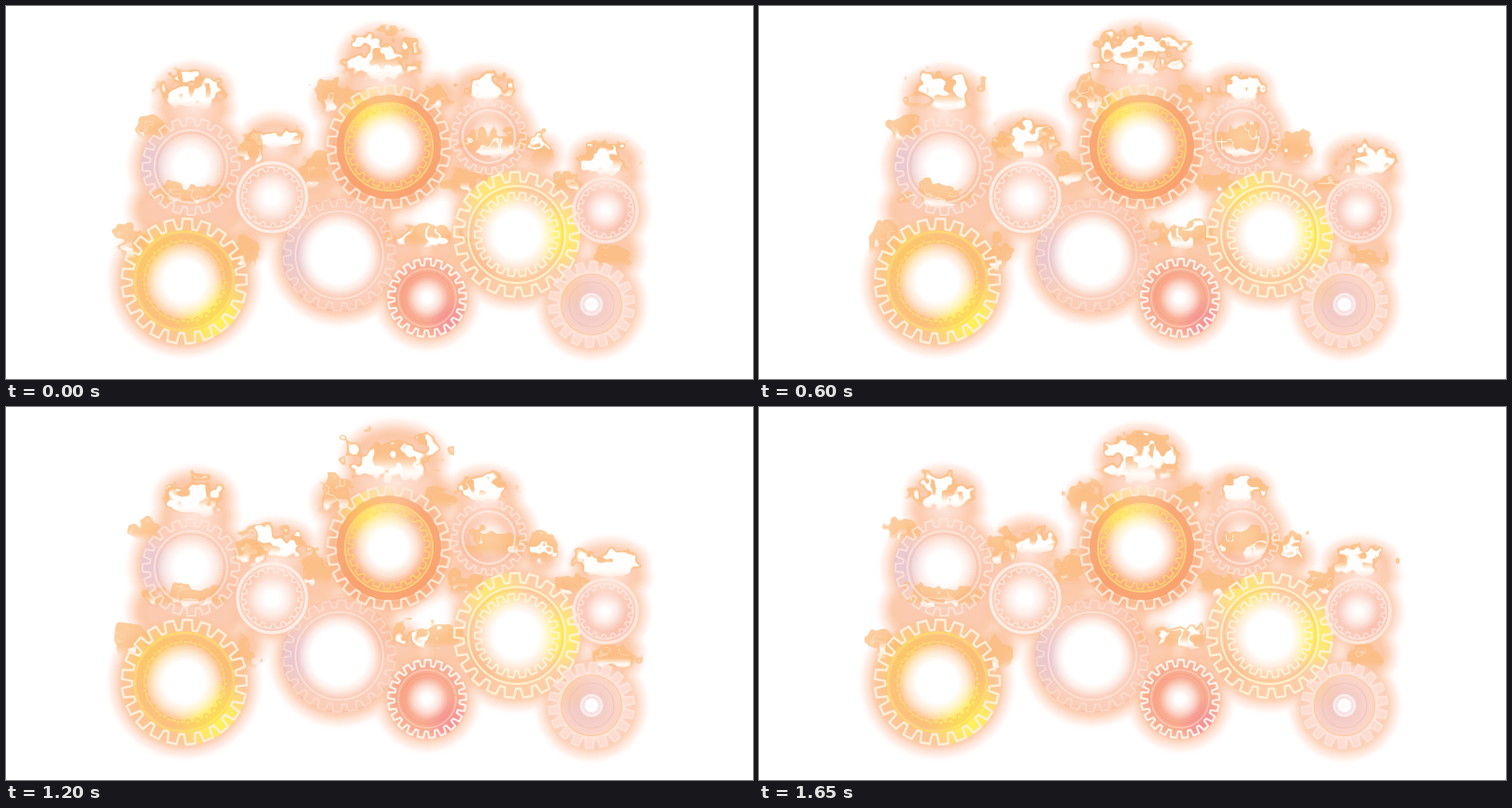
These frames come from a looping animation (800 by 400 pixels, 1.8 s). An HTML page with a canvas:

```html
<!DOCTYPE html>
<html lang="en">
<head>
<meta charset="utf-8">
<title>Burning gears</title>
<style>
html, body { margin: 0; width: 100%; height: 100%; overflow: hidden; background: #fff; }
canvas { display: block; width: 800px; height: 400px; }
</style>
</head>
<body>
<canvas id="stage" width="800" height="400"></canvas>
<script>
const W = 800, H = 400, LOOP = 1800, STEPS = 12, TAU = Math.PI * 2;
const stage = document.getElementById('stage').getContext('2d');

function layer(w = W, h = H) {
  const c = document.createElement('canvas');
  c.width = w;
  c.height = h;
  return c.getContext('2d');
}

// tints: [dx, dy, radius, rgb, alpha]; teeth: [inner, outer, count, colour, width, phase]; rings: [radius, colour, width]
const gears = [
  { x: 357, y: 267, r: 62, fill: '250,207,189', hole: [30, 45],
    tints: [[-50, 0, 42, '225,196,216', .7], [42, -25, 35, '251,178,142', .45]],
    teeth: [[52, 60, 22, 'rgba(255,228,217,.6)', 1.8, 0]],
    rings: [[47, 'rgba(255,232,222,.65)', 2], [60, 'rgba(247,176,150,.35)', 1.5]] },
  { x: 198, y: 172, r: 54, fill: '250,207,188', hole: [17, 38],
    tints: [[-46, -4, 38, '226,198,220', .75], [35, 20, 32, '251,184,145', .5]],
    teeth: [[44, 52, 20, 'rgba(255,230,218,.8)', 2, .1]],
    rings: [[39, 'rgba(255,234,224,.7)', 2], [36, 'rgba(244,172,140,.4)', 1]] },
  { x: 285, y: 205, r: 39, fill: '251,205,187', hole: [7, 29],
    tints: [[-20, -25, 22, '251,190,155', .4]],
    teeth: [[28, 32, 17, 'rgba(255,238,229,.75)', 1.6, 0]],
    rings: [[37, 'rgba(255,239,231,.95)', 3.5], [33, 'rgba(255,236,226,.6)', 1.5]] },
  { x: 517, y: 140, r: 41, fill: '251,205,183', hole: [0, 22],
    tints: [[-12, 8, 24, '248,170,136', .5], [28, 12, 24, '251,180,140', .4]],
    teeth: [[34, 40, 20, 'rgba(255,230,218,.8)', 1.8, .1]],
    rings: [[28, 'rgba(255,234,224,.75)', 2], [31, 'rgba(244,170,138,.35)', 1]] },
  { x: 410, y: 151, r: 66, fill: '250,178,132', hole: [20, 41],
    tints: [[-16, -40, 44, '255,240,92', .95], [30, 30, 44, '249,158,108', .5], [-36, 40, 34, '249,158,110', .5]],
    teeth: [[57, 66, 21, 'rgba(255,232,213,.95)', 2.4, .05], [39, 44, 22, 'rgba(254,221,112,.8)', 1.5, 0]],
    rings: [[52, 'rgba(249,154,98,.48)', 8], [47, 'rgba(255,216,122,.85)', 1.8], [57, 'rgba(255,215,180,.5)', 1.2]] },
  { x: 547, y: 245, r: 68, fill: '253,207,168', hole: [24, 44],
    tints: [[46, 0, 40, '255,243,92', .95], [-28, -46, 40, '255,238,105', .8], [-44, 34, 34, '250,180,140', .6]],
    teeth: [[57, 67, 21, 'rgba(255,243,215,.96)', 2.4, 0], [38, 45, 22, 'rgba(255,246,218,.9)', 2, .1]],
    rings: [[52, 'rgba(255,244,206,.9)', 2], [49, 'rgba(251,190,118,.5)', 1.2]] },
  { x: 642, y: 219, r: 35, fill: '250,203,188', hole: [3, 22],
    tints: [[14, 14, 22, '247,178,156', .4]],
    teeth: [[25, 29, 17, 'rgba(255,236,228,.7)', 1.5, .1]],
    rings: [[34, 'rgba(255,233,223,.9)', 3.5], [30, 'rgba(255,238,230,.6)', 1.3]] },
  { x: 191, y: 295, r: 68, fill: '252,196,140', hole: [22, 42],
    tints: [[34, 40, 46, '255,245,84', .98], [-32, -28, 40, '253,212,94', .6], [44, -26, 30, '251,184,124', .5]],
    teeth: [[56, 67, 21, 'rgba(255,240,220,.97)', 2.4, .08], [41, 45, 26, 'rgba(250,188,92,.6)', 1.3, 0]],
    rings: [[53, 'rgba(255,219,108,.85)', 2.4], [48, 'rgba(251,190,95,.45)', 5], [43, 'rgba(255,225,120,.7)', 1.5]] },
  { x: 451, y: 313, r: 43, fill: '248,170,144', hole: [5, 23],
    tints: [[28, 28, 30, '243,136,152', .8], [-16, -6, 28, '249,155,122', .5]],
    teeth: [[35, 42, 21, 'rgba(255,243,235,.97)', 2.2, .05]],
    rings: [[31, 'rgba(255,205,178,.75)', 1.8], [27, 'rgba(245,150,125,.4)', 1.4]] },
  { x: 627, y: 320, r: 46, fill: '251,214,202', hole: [0, 14],
    tints: [[-4, 0, 31, '231,190,198', .65], [-26, -18, 26, '251,199,145', .5]],
    teeth: [[36, 46, 18, 'rgba(255,231,222,.85)', 1.8, 0, 'rgba(253,226,216,.65)']],
    rings: [[33, 'rgba(250,202,146,.8)', 2], [24, 'rgba(236,190,190,.5)', 1.2], [11, 'rgba(255,245,241,.8)', 2], [5, '#fff', 4]] }
];

// links filling the body between gears: x, y, radius
const links = [
  [355, 102, 17], [463, 97, 15], [572, 160, 13], [597, 200, 12], [652, 265, 20],
  [165, 218, 24], [225, 218, 26], [334, 183, 20], [255, 255, 14], [395, 215, 20],
  [318, 227, 20], [488, 287, 14], [597, 288, 12], [492, 185, 18], [250, 172, 20],
  [426, 258, 18], [470, 258, 15]
];

// tall flames: [cx, cy, rx, ry] at every second step
const tall = [
  [[403, 58, 37, 28], [412, 58, 38, 29], [408, 54, 44, 28], [406, 54, 44, 27], [416, 56, 46, 30], [416, 57, 44, 29]],
  [[201, 92, 32, 20], [197, 95, 32, 22], [198, 96, 35, 22], [203, 97, 35, 25], [203, 98, 33, 22], [197, 95, 30, 19]],
  [[288, 140, 25, 14], [285, 142, 31, 21], [287, 145, 32, 21], [285, 147, 33, 20], [290, 149, 32, 18], [290, 146, 28, 18]],
  [[642, 166, 30, 18], [646, 166, 32, 19], [646, 167, 32, 18], [650, 169, 29, 16], [646, 168, 32, 16], [646, 168, 30, 14]],
  [[513, 89, 28, 15]]
];

// small patches: cx, cy, rx, ry, whiteness
const patches = [
  [193, 204, 34, 14, .25], [352, 98, 20, 20, .3], [524, 148, 30, 17, .45], [573, 153, 14, 18, .7],
  [491, 190, 18, 14, .1], [452, 247, 34, 15, .75], [651, 270, 22, 13, .25], [133, 252, 16, 20, .2],
  [257, 268, 13, 18, .15], [330, 178, 16, 18, .2], [153, 132, 16, 14, .2], [262, 155, 15, 18, .2],
  [462, 98, 16, 13, .1], [605, 190, 14, 14, .3]
];

const smooth = (a, b, v) => {
  const t = Math.min(1, Math.max(0, (v - a) / (b - a)));
  return t * t * (3 - 2 * t);
};

function hash(i, j, seed) {
  let h = Math.imul(i + 101, 374761393) ^ Math.imul(j + 57, 668265263) ^ Math.imul(seed + 7, 1274126177);
  h = Math.imul(h ^ (h >>> 13), 1274126177);
  return ((h ^ (h >>> 16)) >>> 0) / 4294967296;
}

// value noise, periodic in y so the flames loop
function noise(x, y, seed, period) {
  const i = Math.floor(x), j = Math.floor(y);
  const u = smooth(0, 1, x - i), v = smooth(0, 1, y - j);
  const a = ((j % period) + period) % period, b = (a + 1) % period;
  const top = hash(i, a, seed) * (1 - u) + hash(i + 1, a, seed) * u;
  const low = hash(i, b, seed) * (1 - u) + hash(i + 1, b, seed) * u;
  return top * (1 - v) + low * v;
}

const CELLS = 8;
function turbulence(x, y, seed, phase) {
  const a = x / 12, b = y / 12 + phase * CELLS;
  return noise(a, b, seed, CELLS) * .6 + noise(a * 2, b * 2, seed + 1, CELLS * 2) * .4;
}

function pose(keys, step) {
  const n = keys.length, at = step / STEPS * n, i = Math.floor(at) % n, f = at % 1;
  return keys[i].map((v, k) => v + (keys[(i + 1) % n][k] - v) * f);
}

function flame(g, [cx, cy, rx, ry, white = 1], phase, seed) {
  const x0 = Math.floor(cx - rx * 1.4), y0 = Math.floor(cy - ry * 1.4);
  const w = Math.ceil(rx * 2.8), h = Math.ceil(ry * 2.8);
  const tile = layer(w, h), img = tile.createImageData(w, h);
  for (let y = 0; y < h; y++) for (let x = 0; x < w; x++) {
    const u = (x0 + x - cx) / rx, v = (y0 + y - cy) / ry;
    const rough = 1.7 * (1 - .6 * smooth(0, .8, v));
    const n = turbulence(x0 + x, y0 + y, seed, phase) - .5;
    const m = turbulence(x0 + x + 300, y0 + y, seed + 5, phase);
    const body = 1.05 - Math.hypot(u, v) + n * rough;
    const low = smooth(.35, 1.15, v);
    const core = smooth(.2, .34, body) * (1 - low);
    const flake = smooth(.57, .64, m) * (1 - smooth(-.2, .55, v));
    const rim = smooth(-.02, .14, body) * .72 * (1 - smooth(.1, .85, v));
    const light = core * (1 - flake) * (white < 1 ? smooth(.62 - white * .25, .7 - white * .25, m) : 1);
    const alpha = light + (1 - light) * rim;
    const mix = alpha ? light / alpha : 0, k = (y * w + x) * 4;
    img.data[k] = 251 + 4 * mix;
    img.data[k + 1] = 187 + 67 * mix;
    img.data[k + 2] = 122 + 130 * mix;
    img.data[k + 3] = alpha * 255;
  }
  tile.putImageData(img, 0, 0);
  g.drawImage(tile.canvas, x0, y0);
}

function disc(g, x, y, r, stops) {
  const grad = g.createRadialGradient(x, y, 0, x, y, r);
  for (const [at, colour] of stops) grad.addColorStop(at, colour);
  g.fillStyle = grad;
  g.beginPath();
  g.arc(x, y, r, 0, TAU);
  g.fill();
}

function drawDisc(g, { x, y, r, fill, hole, tints }) {
  disc(g, x, y, r * 1.06, [[0, `rgba(${fill},.9)`], [.8, `rgba(${fill},.9)`], [1, `rgba(${fill},0)`]]);
  g.save();
  g.beginPath();
  g.arc(x, y, r, 0, TAU);
  g.clip();
  for (const [dx, dy, size, rgb, a] of tints)
    disc(g, x + dx, y + dy, size, [[0, `rgba(${rgb},${a})`], [.4, `rgba(${rgb},${a * .75})`], [1, `rgba(${rgb},0)`]]);
  g.restore();
  const [r0, r1] = hole;
  disc(g, x, y, r1, [[0, '#fff'], [r0 / r1, '#fff'], [(r0 + r1) / 2 / r1, 'rgba(255,255,255,.62)'], [1, 'rgba(255,255,255,0)']]);
}

function drawTeeth(g, x, y, [inner, outer, count, colour, width, phase, fill]) {
  g.beginPath();
  for (let i = 0; i < count; i++)
    for (const [part, r] of [[0, inner], [.3, inner], [.4, outer], [.9, outer]]) {
      const a = (i + part) / count * TAU + phase;
      g.lineTo(x + Math.cos(a) * r, y + Math.sin(a) * r);
    }
  g.closePath();
  if (fill) {
    g.fillStyle = fill;
    g.moveTo(x + inner - 2, y);
    g.arc(x, y, inner - 2, 0, TAU);
    g.fill('evenodd');
  }
  g.strokeStyle = colour;
  g.lineWidth = width;
  g.lineJoin = 'round';
  g.stroke();
}

function drawLines(g, { x, y, teeth, rings }) {
  for (const [r, colour, width] of rings) {
    g.strokeStyle = colour;
    g.lineWidth = width;
    g.beginPath();
    g.arc(x, y, r, 0, TAU);
    g.stroke();
  }
  for (const t of teeth) drawTeeth(g, x, y, t);
}

const discs = layer(), lines = layer();
for (const gear of gears) {
  drawDisc(discs, gear);
  drawLines(lines, gear);
}

// soft silhouette, grown by d
function glow(g, domes, d, blur, colour) {
  g.filter = `blur(${blur}px)`;
  g.fillStyle = colour;
  g.beginPath();
  const blob = (x, y, rx, ry) => {
    g.moveTo(x + rx + d, y);
    g.ellipse(x, y, rx + d, ry + d, 0, 0, TAU);
  };
  for (const { x, y, r } of gears) blob(x, y, r, r);
  for (const [x, y, r] of links) blob(x, y, r, r);
  for (const [x, y, rx, ry] of domes) {
    blob(x, y, rx, ry);
    blob(x, y + ry * .9, rx * 1.05, ry * .8);
  }
  g.fill();
  g.filter = 'none';
}

function render(step) {
  const g = layer(), phase = step / STEPS;
  const flames = tall.map(keys => pose(keys, step));
  g.fillStyle = '#fff';
  g.fillRect(0, 0, W, H);
  glow(g, flames, 13, 2, '#fff3ee');
  glow(g, flames, 8, 4, '#fee3d5');
  glow(g, flames, 2, 5, '#fcc6a2');
  glow(g, flames, -5, 5, '#fbcab0');
  disc(g, 458, 228, 26, [[0, '#fff'], [.45, 'rgba(255,255,255,.85)'], [1, 'rgba(255,255,255,0)']]);
  g.drawImage(discs.canvas, 0, 0);
  flames.forEach((f, i) => {
    // pale haze where the flame meets its gear
    disc(g, f[0], f[1] + f[3] * .8, f[2], [[0, 'rgba(255,236,228,.85)'], [.5, 'rgba(254,224,211,.6)'], [1, 'rgba(254,224,211,0)']]);
    flame(g, f, phase, i * 11);
  });
  patches.forEach((p, i) => flame(g, p, phase, 80 + i * 11));
  g.drawImage(lines.canvas, 0, 0);
  return g.canvas;
}

const frames = [];
let shown = -1;
function tick() {
  const step = Math.floor(performance.now() % LOOP / (LOOP / STEPS));
  if (step !== shown) {
    frames[step] = frames[step] || render(step);
    stage.drawImage(frames[step], 0, 0);
    shown = step;
  }
  requestAnimationFrame(tick);
}
tick();
</script>
</body>
</html>
```
